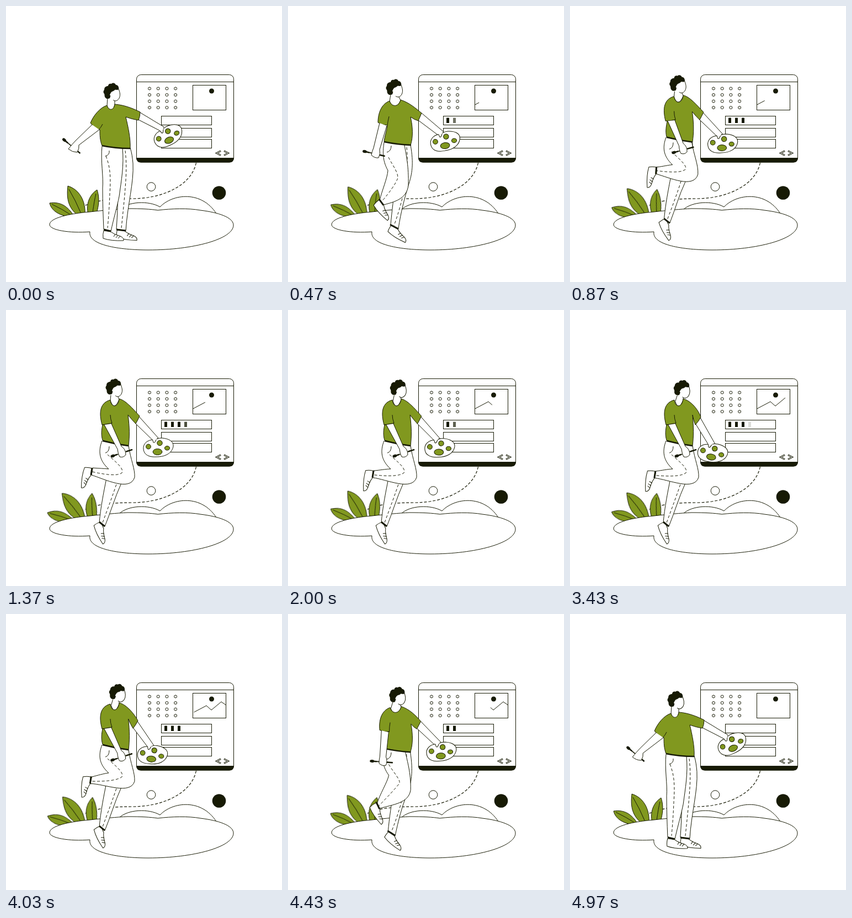
Animation of 500 by 500 pixels, one loop 5000 ms. Source, as an HTML page:

```html
<!DOCTYPE html>
<html lang="en">
<head>
<meta charset="utf-8">
<title>Painter at a web page</title>
<style>
  html, body { margin: 0; width: 100%; height: 100%; overflow: hidden; background: #fff; }
  svg { display: block; width: 100%; height: 100%; }
  .line { fill: none; stroke: #171a04; stroke-width: 1; }
  .white { fill: #fff; stroke: #171a04; stroke-width: 1; stroke-linejoin: round; }
  .green { fill: #81981f; stroke: #171a04; stroke-width: 1; stroke-linejoin: round; }
  .dark { fill: #171a04; }
  .band { fill: none; stroke: #171a04; stroke-width: 3; }
  .belt { fill: none; stroke: #171a04; stroke-width: 2.5; }
  .seam { fill: none; stroke: #171a04; stroke-width: 1; stroke-dasharray: 5 3.5; }
  .trail { fill: none; stroke: #171a04; stroke-width: 1.2; stroke-dasharray: 5 3; }
  .code { fill: none; stroke: #171a04; stroke-width: 2.7; }
  .code.core { stroke: #fff; stroke-width: 1; }

  .leaf { animation: sway 1250ms cubic-bezier(.37, 0, .63, 1) infinite alternate; }
  @keyframes sway { to { transform: rotate(-12.5deg); } }

  .chart { stroke-dasharray: 100 200; animation: chart 5s linear infinite; }
  @keyframes chart {
    0% { stroke-dashoffset: 100; }
    80% { stroke-dashoffset: 0; }
    99.3%, 100% { stroke-dashoffset: -100; }
  }
</style>
</head>
<body>
<svg viewBox="0 0 500 500">
  <defs>
    <g id="shoe">
      <path class="white" d="M-6 -1L7 1Q13 6 24 9Q31 12 30 17Q8 18 -7 13Q-8 5 -6 -1Z"/>
      <path class="line" d="M12 10L15 5M16 12L20 7M20 13L24 9"/>
    </g>
    <g id="head">
      <path class="white" d="M11 -7C14 0 16 6 13 12C11 16 6 19 2 15"/>
      <path fill="#fff" d="M-2 -8L11 -7L12 8L3 15L-7 14Z"/>
      <path class="dark" d="M-14 -3C-14 -8 -11 -10 -7 -10C-7 -14 -3 -15 -1 -14C2 -17 6 -15 7 -12C11 -12 13 -8 12 -4C9 -2 7 -4 5 -3C3 0 0 -1 -1 1C-2 2 -2 3 -2 5C-3 8 -3 10 -4 12C-7 14 -11 13 -12 11C-14 9 -13 6 -14 4C-16 2 -16 -1 -14 -3Z"/>
      <path fill="#fff" d="M-2 2C1 0 3 3 1 6C0 8 -3 8 -4 6Z"/>
    </g>
    <g id="palette">
      <path class="white" d="M-7 -14C-20 -14 -27 -6 -26 3C-25 14 -15 18 -2 17C14 17 26 10 28 -2C29 -11 20 -16 8 -17C2 -17 -3 -16 -4 -13C-5 -9 -8 -9 -7 -14Z"/>
      <path fill="#fff" d="M-10 -16L-8 -9Q-6 -8 -5 -10L-1 -17.5Z"/>
      <path class="line" d="M-9.5 -14L-8 -9Q-6 -8 -5 -10L-3 -14"/>
      <circle class="green" cx="-17" cy="-1.5" r="4.4"/>
      <circle class="green" cx="3.5" cy="-8" r="4.7"/>
      <ellipse class="green" cx="17" cy="1.2" rx="4.6" ry="3.8"/>
      <ellipse class="green" cx="-.5" cy="8" rx="8.4" ry="5.5"/>
    </g>
    <g id="brush">
      <path class="belt" style="stroke-width:1.6" d="M-16 0H20"/>
      <path class="belt" d="M-16 0H-9M8 0H20"/>
      <ellipse class="dark" cx="-17.5" cy="0" rx="4" ry="2.6"/>
    </g>
  </defs>

  <path class="trail" d="M344.5 284C336 325 285 348 232 349C195 349 165 351 142 362"/>

  <g id="window">
    <rect class="white" x="236.5" y="124.5" width="176" height="158.5" rx="8"/>
    <path class="line" d="M236.5 137.5H412.5"/>
    <path class="dark" d="M236 275H413V276Q412 283.5 405 283.5H244Q237 283.5 236 276Z"/>
    <rect class="line" x="338.5" y="143.5" width="60" height="45"/>
    <path class="line chart" pathLength="100" d="M338.5 179L363 166L372 174L390 159L398.5 165"/>
    <circle class="dark" cx="372.5" cy="154" r="4.5"/>
    <rect class="line" x="281.5" y="199.5" width="91" height="16"/>
    <rect class="line" x="281.5" y="221.5" width="91" height="16"/>
    <rect class="line" x="281.5" y="241.5" width="91" height="16"/>
    <path class="code" d="M389 262.5L381.5 266.5L389 270.5M395 262.5L402.5 266.5L395 270.5"/>
    <path class="code core" d="M388.5 262.8L381.5 266.5L388.5 270.2M395.5 262.8L402.5 266.5L395.5 270.2"/>
  </g>

  <circle class="white" cx="263" cy="327.5" r="7.8"/>
  <circle class="dark" cx="386" cy="338.5" r="12.3"/>
  <path class="white" d="M205 369C221 354 258 352 279 364C302 340 354 334 381 376"/>

  <g class="leaf" style="transform-origin:125px 381px">
    <path class="green" d="M124 382C112 362 98 354 79 357C82 371 98 382 124 382Z"/>
    <path class="line" d="M120 380Q102 368 83 359"/>
  </g>
  <g class="leaf" style="transform-origin:135px 378px">
    <path class="green" d="M134 382C110 366 110 345 112 326C132 332 145 352 143 380Z"/>
    <path class="line" d="M136 376Q126 352 114 332"/>
  </g>
  <g class="leaf" style="transform-origin:157px 375px">
    <path class="green" d="M149 378C144 358 152 341 165 333C170 348 168 362 164 376Z"/>
    <path class="line" d="M157 374Q160 352 163 340"/>
  </g>

  <path class="white" d="M79 396C79 384 115 376 152 373C178 370 200 368 220 367C245 367 262 368 275 370C300 367 330 366 352 370C385 374 412 383 412 397C412 422 340 442 258 442C205 442 148 433 152 409C115 412 79 406 79 396Z"/>

  <g id="man"></g>
</svg>
<script>
const LOOP = 5000, MID = 0.455;
const NUM = /-?\d+(\.\d+)?/g;
const $ = id => document.getElementById(id);
const clamp = x => Math.min(1, Math.max(0, x));
const smooth = x => { x = clamp(x); return x * x * (3 - 2 * x); };

function add(parent, tag, attrs) {
  const el = document.createElementNS('http://www.w3.org/2000/svg', tag);
  for (const k in attrs) el.setAttribute(k, attrs[k]);
  return parent.appendChild(el);
}

// Each part lists its poses: standing, stepping, leg raised, and an optional
// fourth pose that is mixed in by its own weight.
const parts = [];
function part(el, draw, poses, weight) {
  parts.push({ el, draw, weight, keys: poses.map(p => p.match(NUM).map(Number)) });
}
function shape(cls, poses, weight) {
  const draw = (el, v) => {
    let i = 0;
    el.setAttribute('d', poses[0].replace(NUM, () => v[i++].toFixed(2) + ' '));
  };
  part(add($('man'), 'path', { class: cls }), draw, poses, weight);
}
function rigid(id, poses, weight) {
  const draw = (el, [x, y, a]) => el.setAttribute('transform', `translate(${x} ${y}) rotate(${a})`);
  part(add($('man'), 'use', { href: '#' + id }), draw, poses, weight);
}

// Standing leg
rigid('shoe', ['208 406 3', '193 400 26', '174 389.5 58']);
shape('white', [
  'M200 257C203 300 204 350 200 404L217 407C220 360 232 320 230 285C229 275 228 266 225 257',
  'M200 252C200 290 190 350 186 396L200 403C204 375 212 345 218 325C225 305 228 285 222 252',
  'M190 250C190 280 174 330 169 385L179 392C190 365 197 340 208 316C222 295 222 270 222 247']);
shape('band', ['M200 405L217 407', 'M185 396L200 404', 'M169 384L179 392']);
shape('seam', [
  'M216 262C219 290 219 310 209 402',
  'M215 256C218 290 216 330 192 398',
  'M214 250C212 290 195 330 174 388']);

// Raised leg
rigid('shoe', ['183 408 0', '169 356 41.5', '155 293 93', '152.5 302 87'], 'foot');
shape('white', [
  'M174 254C171 280 177 310 175 330C175 355 176 380 177 404L190 408C195 385 201 365 205 345C209 315 214 290 211 257',
  'M174 247C172 262 170 278 181 298C180 312 170 335 166 352L174 360C192 355 215 350 218 325C219 290 214 270 211 252',
  'M174 237C167 255 168 272 186 288C178 287 168 287 157 286L155 299C178 306 225 330 233 303C234 288 226 272 222 246',
  'M174 237C167 255 168 272 186 288C178 289 165 293 155 296L152 308C180 308 225 328 233 303C234 288 226 272 222 246'], 'foot');
shape('band', ['M177 405L190 408', 'M165 350L173 361', 'M156 286L154 299', 'M154 295L152 308'], 'foot');
shape('seam', [
  'M181 272C186 285 191 300 188 340Q187 370 184 402',
  'M182 274C190 290 202 304 198 314Q192 328 170 354',
  'M184 262C195 272 215 287 210 295Q200 303 156 293',
  'M184 262C195 272 215 287 210 295Q198 304 154 304'], 'foot');
shape('line', ['M187 262Q188 270 180 272', 'M187 253Q187 263 179 265', 'M187 247Q187 257 180 259']);

// Arm with the palette
shape('white', [
  'M243 193L286 219L281 227L240 206',
  'M242 194L282 228L272 234L236 207',
  'M241 193L276 232L266 236L234 205',
  'M236 195L263 243L252 246L228 207'], 'arm');
rigid('palette', ['293 235.5 -22', '284 245 -8', '275 249 0', '257.5 258.5 9'], 'arm');

// Neck, shirt, belt, head
shape('white', [
  'M184 165L183 181Q191 200 197 179L197 170',
  'M186 160L184 173Q194 192 204 171L200 163',
  'M190 153L189 164Q196 184 205 162L202 155',
  'M195 155L191 166Q197 184 205 163L206 157'], 'head');
shape('green', [
  'M183 180C186 190 195 190 197 178C214 179 231 186 243 192Q243 200 240 207Q228 205 217 201C221 218 226 240 225 258Q198 258 174 253C170 243 170 233 170 224L167 224Q159 219 153 212C158 199 170 184 183 180Z',
  'M184 172C188 184 201 183 204 170C220 175 232 186 242 194Q239 201 236 208Q229 206 222 201C226 218 227 238 222 252Q198 251 174 246C175 235 179 227 180 216L180 216Q171 216 163 211C163 196 168 178 184 172Z',
  'M189 163C191 178 203 177 205 161C216 163 229 178 242 192Q239 199 235 206Q228 199 221 190C224 212 224 230 222 246Q198 243 175 236C172 226 173 217 175 208L192 205Q183 208 174 208C168 186 170 168 189 163Z',
  'M189 163C191 178 203 177 205 161C216 163 231 177 237 194Q233 202 227 208Q224 201 222 190C224 212 224 230 222 246Q198 243 175 236C172 226 173 217 175 208L192 205Q183 208 174 208C168 186 170 168 189 163Z'], 'arm');
shape('line', ['M168 224Q172 220 175 214', 'M180 216Q181 208 183 200', 'M192 205Q189 197 189 190']);
shape('belt', ['M174 253Q198 258 225 258', 'M174 246Q198 251 223 252', 'M175 237Q198 243 222 246']);
rigid('head', ['192 155 0', '193 148 0', '196 140 0', '204.5 142.5 7'], 'head');

// Arm with the brush
rigid('brush', ['119 254 40', '156 267.5 13', '210 259 -18']);
shape('white', [
  'M156 215L127 243Q120 250 113 259Q120 265 129 265Q133 258 132 252L169 224',
  'M166 212L155 257Q152 264 151 270Q157 276 164 275Q168 268 166 260L179 217',
  'M178 208L202 252Q203 262 206 266Q213 268 217 262Q217 252 209 247L191 206']);

// Small circles and the filling blocks in the window
for (let i = 0; i < 16; i++)
  add($('window'), 'circle', { class: 'white', cx: 260 + i % 4 * 15.7, cy: 149.5 + (i >> 2) * 11.5, r: 2.5 });
const blocks = [0, 1, 2, 3].map(i =>
  add($('window'), 'rect', { class: 'dark', x: 287 + i * 12, y: 202.5, width: 5, height: 9.5 }));

// Smooth curve through [time, value] keys
function curve(keys, t) {
  let i = 0;
  while (i < keys.length - 2 && t >= keys[i + 1][0]) i++;
  const slope = j => {
    const a = keys[j - 1], b = keys[j + 1];
    return a && b ? (b[1] - a[1]) / (b[0] - a[0]) : 0;
  };
  const [t0, v0] = keys[i], [t1, v1] = keys[i + 1];
  const d = t1 - t0, x = (t - t0) / d, e = smooth(x);
  return Math.max(0, v0 + (v1 - v0) * e + d * x * (1 - x) * (slope(i) * (1 - x) - slope(i + 1) * x));
}
const tracks = {
  arm: [[0, 0], [1370, 0], [2630, .25], [3430, 1], [4430, .25], [LOOP, 0]],
  head: [[0, 0], [1370, 0], [2630, 1], [3430, .85], [4430, .6], [LOOP, 0]],
  foot: [[0, 0], [1370, 0], [2630, 1], [3430, .6], [4430, .95], [LOOP, 0]]
};

function draw(t) {
  const u = smooth(t / 1000) - smooth((t - 4000) / 1000);
  const a = (u - MID) * (u - 1) / MID;
  const b = u * (1 - u) / (MID * (1 - MID));
  const c = u * (u - MID) / (1 - MID);
  for (const { el, draw, weight, keys: [A, B, C, D] } of parts) {
    const w = D ? curve(tracks[weight], t) : 0;
    draw(el, A.map((v, i) => a * v + b * B[i] + c * C[i] + (D ? w * (D[i] - C[i]) : 0)));
  }
  const p = t % 2500;
  blocks.forEach((el, i) => {
    const on = 130 + i * 260, off = 1340 + (3 - i) * 310;
    el.setAttribute('opacity', clamp((p - on) / 130) - clamp((p - off) / 130));
  });
}

let start;
function tick(now) {
  start ??= now;
  draw((now - start) % LOOP);
  requestAnimationFrame(tick);
}
draw(0);
requestAnimationFrame(tick);
</script>
</body>
</html>
```
